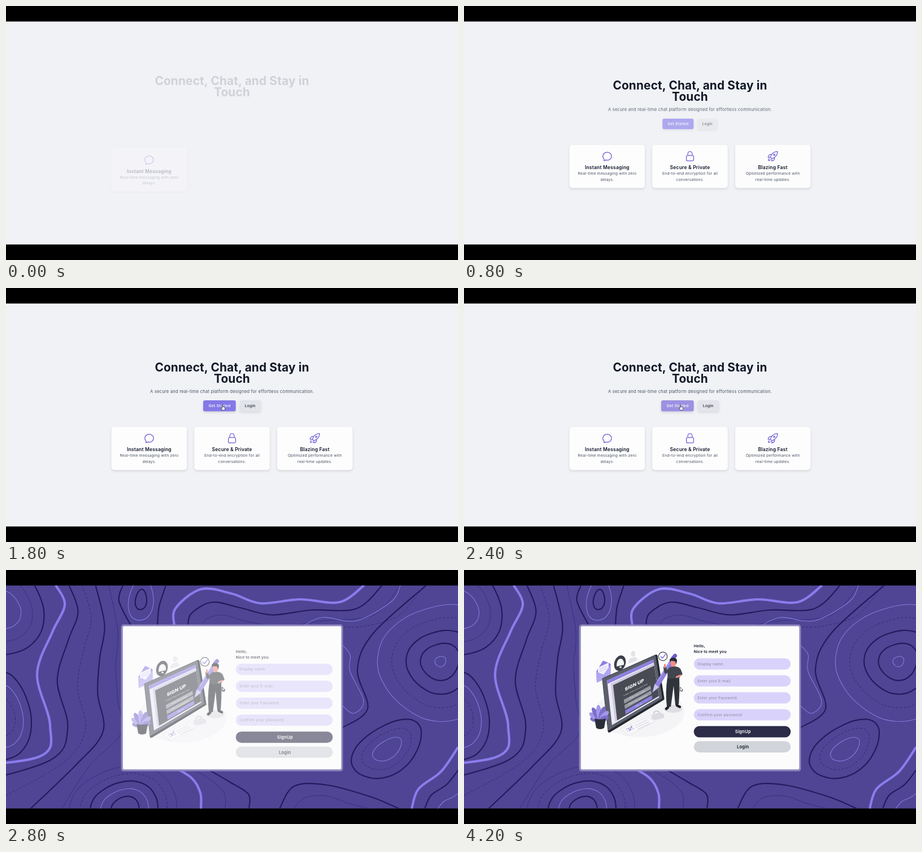
An HTML page for the animation above (4.4 s loop, 800 by 450 pixels).

```html
<!DOCTYPE html>
<html lang="en">
<head>
<meta charset="utf-8">
<title>Chat landing and sign-up</title>
<style>
  html, body { margin: 0; width: 100%; height: 100%; overflow: hidden; background: #000; }
  svg { display: block; width: 800px; height: 450px; }
  text { font-family: Inter, "Open Sans", sans-serif; letter-spacing: .022em; }
  .mid { text-anchor: middle; }
  .h1 { font-size: 20.8px; font-weight: 700; letter-spacing: .008em; fill: #111827; }
  .lead { font-size: 7.7px; fill: #4b5563; }
  .title { font-size: 8.53px; font-weight: 600; fill: #111827; }
  .desc { font-size: 6.83px; fill: #4b5563; }
  .btn { font-size: 6.83px; font-weight: 500; }
  .hello { font-size: 6.83px; font-weight: 600; fill: #111827; }
  .hint { font-size: 6.83px; fill: #8d89a2; }
  .cta { font-size: 7.68px; font-weight: 600; }
  .icon { fill: none; stroke: #6c5fd3; stroke-width: 1.5; stroke-linecap: round; stroke-linejoin: round; }
  .topo path { fill: none; }
  .topo .L { stroke: #8b7cec; stroke-width: 4.2; }
  .topo .D { stroke: #231a5e; stroke-width: 2.2; }
  .topo .l { stroke: #8579df; stroke-width: 1.1; }
  .topo .d { stroke: #392f80; stroke-width: 1; }
  .topo .s { stroke: #2f2673; stroke-width: .9; stroke-dasharray: 4 3; }
</style>
</head>
<body>
<svg viewBox="0 0 800 450" xmlns="http://www.w3.org/2000/svg">
  <defs>
    <clipPath id="view"><rect y="27.6" width="800" height="394.9"/></clipPath>
    <filter id="soft" x="-20%" y="-30%" width="140%" height="170%">
      <feDropShadow dx="0" dy="2" stdDeviation="2" flood-opacity=".13"/>
    </filter>
  </defs>
  <rect width="800" height="450"/>
  <g clip-path="url(#view)">
    <g id="home">
      <rect width="800" height="450" fill="#f1f2f6"/>
      <g id="head">
        <text class="h1 mid" x="400" y="147.6">Connect, Chat, and Stay in</text>
        <text class="h1 mid" x="400" y="167.8">Touch</text>
      </g>
      <g id="lead"><text class="lead mid" x="400" y="185.7">A secure and real-time chat platform designed for effortless communication.</text></g>
      <g id="buttons">
        <rect id="start" x="349" y="199" width="57.7" height="19.6" rx="3.4" filter="url(#soft)"/>
        <text class="btn mid" x="378" y="211.4" fill="#fff">Get Started</text>
        <rect x="413.5" y="199" width="37.5" height="19.6" rx="3.4" fill="#e3e4e9" filter="url(#soft)"/>
        <text class="btn mid" x="432.2" y="211.4" fill="#1f2937">Login</text>
      </g>
      <g id="cards"></g>
    </g>
    <g id="signup">
      <rect width="800" height="450" fill="#4f4594"/>
      <g id="topo" class="topo"></g>
      <rect x="203.6" y="96.6" width="392.8" height="260" rx="4.5" fill="#8d87bd"/>
      <rect x="206.8" y="99.6" width="386.6" height="253.6" rx="2.5" fill="#fcfcfd"/>
      <g id="content">
        <g id="art"></g>
        <g id="form"></g>
      </g>
    </g>
    <g id="cursor" stroke="#222" stroke-width=".7" stroke-linejoin="round" fill="#fff">
      <path id="arrow" d="M0 0V7.2L1.7 5.7 2.9 8.2 4.1 7.6 3 5.3 5.2 5.1Z"/>
      <path id="hand" d="M0 0H1.2V3Q5 3 5 5V7L4 9H.5L-2 5.4-1 4.9 0 5.7Z"/>
    </g>
  </g>
</svg>
<script>
const LOOP = 4400, STEP = 200, SIGNUP_AT = 2600;
const $ = id => document.getElementById(id);
const clamp = v => Math.max(0, Math.min(1, v));
const lerp = (a, b, k) => a + (b - a) * k;
const blend = (a, b, k) => a.map((v, i) => lerp(v, b[i], k));

// Smooth path through points
function curve(p, closed) {
  const n = p.length;
  const at = i => closed ? p[(i + n) % n] : p[Math.max(0, Math.min(n - 1, i))];
  let d = 'M' + p[0];
  for (let i = 0; i < n - !closed; i++) {
    const [a, b, c, e] = [at(i - 1), at(i), at(i + 1), at(i + 2)];
    const c1 = b.map((v, k) => v + (c[k] - a[k]) / 6);
    const c2 = c.map((v, k) => v - (e[k] - b[k]) / 6);
    d += `C${c1} ${c2} ${c}`;
  }
  return d + (closed ? 'Z' : '');
}

// Contour map; each letter of `kinds` is the line style of one contour
const contour = (kind, pts, closed) => `<path class="${kind}" d="${curve(pts, closed)}"/>`;

// Nested wobbly rings around a summit
function hill(cx, cy, tilt, kinds, rx, ry, growX, growY) {
  return [...kinds].map((kind, k) => contour(kind, Array.from({ length: 14 }, (_, i) => {
    const a = i / 14 * 2 * Math.PI, r = 1 + .05 * Math.sin(3 * a + cx);
    const x = r * (rx + k * growX) * Math.cos(a), y = r * (ry + k * growY) * Math.sin(a);
    const c = Math.cos(tilt), s = Math.sin(tilt);
    return [cx + x * c - y * s, cy + x * s + y * c];
  }), true)).join('');
}

// Lines spread evenly between two banks
function flow(kinds, from, to = from) {
  const points = s => s.split(' ').map(p => p.split(',').map(Number));
  const a = points(from), b = points(to);
  return [...kinds].map((kind, k) =>
    contour(kind, a.map((p, i) => blend(p, b[i], k / Math.max(1, kinds.length - 1))))).join('');
}

$('topo').innerHTML =
  hill(-6, 72, 0, 'ldD', 32, 34, 20, 24) +
  hill(-6, 262, 0, 'slD', 22, 34, 14, 22) +
  hill(239, 53, .1, 'Dl', 10, 18, 12, 20) +
  hill(212, 425, 0, 'DlDsd', 25, 24, 17.5, 13.5) +
  hill(769, 162, -.5, 'lDDsl', 10, 9, 25, 23) +
  hill(675, 318, -.6, 'lsD', 29, 16, 20, 13) +
  flow('LDsDd', '88,27 104,62 82,110 55,185 78,275 58,331 -110,350', '182,27 198,110 194,170 198,230 203,290 144,352 70,470') +
  flow('LDd', '298,100 300,68 345,34 400,42 450,59 520,52 590,57 634,27', '346,100 356,86 385,80 430,92 490,100 560,90 650,80 698,27') +
  flow('ls', '524,100 560,84 620,90 682,56 698,27', '570,100 630,100 690,84 720,55 740,27') +
  flow('DD', '207,27 200,55 222,100', '283,27 271,65 268,100') +
  flow('l', '594,132 609,150 609,180 633,232 615,254 594,239') +
  flow('D', '594,280 640,246 622,176 650,112 744,27') +
  flow('LdD', '345,423 344,395 328,368 290,345', '430,423 429,397 395,375 352,350') +
  flow('Dd', '484,423 510,383 568,381 646,402 696,423', '510,423 528,404 566,400 608,414 644,423') +
  flow('LDl', '718,423 730,388 770,357 800,314', '764,423 775,410 790,403 800,396');

const cards = [
  ['Instant Messaging', 'Real-time messaging with zero', 'delays.',
    'M5.3 17.5A9 8.25 0 1 1 9.4 19.9 6 6 0 0 1 5 20.9Q6.3 19 5.3 17.5Z'],
  ['Secure &amp; Private', 'End-to-end encryption for all', 'conversations.',
    'M16.5 10.5V6.75a4.5 4.5 0 1 0-9 0v3.75M6.75 10.5h10.5a2.25 2.25 0 0 1 2.25 2.25v6.75a2.25 2.25 0 0 1-2.25 2.25H6.75a2.25 2.25 0 0 1-2.25-2.25v-6.75a2.25 2.25 0 0 1 2.25-2.25Z'],
  ['Blazing Fast', 'Optimized performance with', 'real-time updates.',
    'M9.6 8.4A15 15 0 0 1 21.75 2.25 15 15 0 0 1 15.6 14.4 15 15 0 0 1 9.75 16.95L7.05 14.25A15 15 0 0 1 9.6 8.4a6 6 0 0 0-7.35 5.85h4.8M15.6 14.4a6 6 0 0 1-5.85 7.35v-4.8M4.5 16.6a4.5 4.5 0 0 0-1.75 4.3 4.5 4.5 0 0 0 4.3-1.75M16.5 9a1.5 1.5 0 1 1-3 0 1.5 1.5 0 0 1 3 0Z']
];
$('cards').innerHTML = cards.map(([title, a, b, icon], i) => {
  const x = 253.4 + 146.6 * i;
  return `<g><rect x="${x - 66.6}" y="246" width="133.2" height="76.2" rx="5" fill="#fdfdfe" filter="url(#soft)"/>
    <path class="icon" transform="translate(${x - 10.24} 255.9) scale(.853)" d="${icon}"/>
    <text class="title mid" x="${x}" y="289.4">${title}</text>
    <text class="desc mid" x="${x}" y="299.4">${a}</text>
    <text class="desc mid" x="${x}" y="309.6">${b}</text></g>`;
}).join('');

const pill = (y, fill) => `<rect x="406.7" y="${y}" width="171.6" height="20" rx="10" fill="${fill}"/>`;
$('form').innerHTML =
  '<text class="hello" x="406.8" y="137">Hello,</text><text class="hello" x="406.8" y="147.2">Nice to meet you</text>' +
  ['Display name.', 'Enter your E-mail.', 'Enter your Password.', 'Confirm your password'].map((s, i) =>
    pill(156.5 + 30 * i, '#d9d3fb') + `<text class="hint" x="413.3" y="${168.8 + 30 * i}">${s}</text>`).join('') +
  pill(276.6, '#2c2c48') + '<text class="cta mid" x="493.7" y="289.3" fill="#fff">SignUp</text>' +
  pill(303.3, '#d1d4d9') + '<text class="cta mid" x="493.7" y="316" fill="#111827">Login</text>';

// Illustration
const ink = '#3b3f48', lilac = '#8d7fe0', pale = '#c9c1f4', mist = '#e2e2e8', skin = '#ee8f88';
const shape = (d, fill) => `<path d="${d}" fill="${fill}"/>`;
const oval = (x, y, rx, ry, fill) => `<ellipse cx="${x}" cy="${y}" rx="${rx}" ry="${ry}" fill="${fill}"/>`;
const line = (d, color, w) => `<path d="${d}" fill="none" stroke="${color}" stroke-width="${w}" stroke-linecap="round" stroke-linejoin="round"/>`;

// Tablet plane: u runs along the top edge, v down the side
const plane = (u, v) => blend(blend([246, 193], [339, 152], u), blend([256, 285], [351, 228], u), v);
const panel = (u, v, u2, v2, fill, edge = 0) =>
  `<path d="M${plane(u, v)}L${plane(u2, v)} ${plane(u2, v2)} ${plane(u, v2)}Z" fill="${fill}" stroke="${fill}" stroke-width="${edge}" stroke-linejoin="round"/>`;
const label = (u, v, size, s, weight) =>
  `<text class="mid" transform="matrix(.94 -.46 .1 .92 ${plane(u, v).join(' ')})" font-size="${size}" font-weight="${weight}" fill="#fff">${s}</text>`;

const tablet =
  panel(.01, .01, 1.01, 1.01, '#24272e', 5) +
  panel(0, 0, .99, .98, '#5b5f6b', 2) +
  panel(.07, .06, .95, .93, '#eceaf8') +
  panel(.07, .06, .95, .13, lilac) +
  panel(.13, .15, .95, .9, '#cfcadf') +
  panel(.17, .2, .95, .9, '#484b54') +
  label(.55, .43, 8.6, 'SIGN UP', 800) +
  label(.56, .52, 3.1, 'Create a New Account is Free', 400) +
  ['Enter your e-mail', 'Enter your password', 'Sign up'].map((s, i) => {
    const v = .58 + .11 * i;
    return panel(.33, v, .83, v + .08, i < 2 ? '#989aa4' : lilac) + label(.58, v + .055, 3.4, s, 400);
  }).join('');

// Seven leaves fanned over the pot
const plant = Array.from({ length: 7 }, (_, i) => {
  const len = 17 + 10 * Math.sin(i / 6 * Math.PI);
  return `<ellipse cy="${-len / 2}" rx="4.6" ry="${len / 2}" transform="translate(240 266) rotate(${-80 + 25 * i})" fill="${i % 2 ? '#a297e8' : '#7b6fcb'}"/>`;
}).join('') + shape('M231 263Q241 266 251 263L248 280Q241 284 234 280Z', '#2c2e37');

const envelope =
  shape('M234 180 246 160.5 259.5 166V188L235 199.5Z', lilac) +
  shape('M237 173 256 164V184L237 192Z', '#f1effc') +
  line('M240 176 253 170M240 180 253 174', pale, 1) +
  shape('M234 180 247 185 259.5 168V188L235 199.5Z', '#b0a6f0');

const badges =
  `<g transform="rotate(18 276 165)">${oval(276, 165, 10, 14, ink)}</g>` +
  shape('M270 171Q270 158 277 157 284 158 283 168Z', '#f4f4f6') + oval(277, 172, 2, 1.6, '#f4f4f6') +
  oval(299.5, 148.5, 4, 5, mist) + shape('M291 166Q291 155 299 155 306 152 307 160Z', mist) +
  oval(352, 153, 8.3, 8.3, ink) + oval(352, 153, 7.1, 7.1, '#fff') +
  line('M348.5 153.5 351.3 156.3 356.5 149.5', lilac, 1.8);

const paper =
  line('M279 281 325 261 338 268 291 293Z', '#d6d6dc', 1) + shape('M279 281 325 261 338 268 291 293Z', '#f8f8fa') +
  line('M287 282 296 278 301 281 291 286Z', '#a5a6ae', .7) + line('M291 281 294 283.5 297 276', lilac, 1.3) +
  [0, 1, 2].map(i => line(`M${302 + 3 * i} ${276 + 3 * i}l22-10.500`, '#cdced6', 1)).join('') +
  line('M336 257V253Q339 248 345 251V256', '#d3d4db', 2) + shape('M332 257 347 252 354 256V262L338 266 332 263Z', '#dcdde2');

const pen =
  line('M342 203.5 370.5 158', lilac, 8.5) + line('M370 156 373.5 152', '#6b5cc5', 7) +
  line('M343 196.5 363 165', '#a89cf0', 2) + shape('M337.5 202 345.5 207.5 333.5 217Z', pale);

const man =
  shape('M360 190H381Q382 215 380 238L374 239.5 371 205 366 242.5 359 242Q356 216 360 190Z', '#2f343b') +
  line('M361 243.500 358 246M377 240 382 242.500', '#20222a', 4.500) +
  shape('M363 173Q372 168 381 173 385 180 381 192.5H360.5Q359 182 363 173Z', '#41454d') +
  line('M364 177 357 181 355.5 173', '#41454d', 5) + line('M355.5 172 355.5 168', skin, 3.5) +
  line('M381 176.5 384 184', '#41454d', 5) + line('M383 187 376.5 189.5', skin, 3.4) +
  oval(370.5, 165, 5, 6.5, skin) +
  shape('M365 163Q362 156 369 155.5 377 155 377 161L375.5 167 374 162 367 160.5Z', '#262831');

$('art').innerHTML = oval(311, 252, 79, 44, '#f4f4f6') + oval(370, 246, 16, 7, '#dedee3') +
  envelope + badges + tablet + paper + plant + pen + man;

// Motion
const ease = (t, start, dur) => 1 - Math.pow(1 - clamp((t - start) / dur), 1.5);
const show = (el, on) => el.setAttribute('display', on ? 'inline' : 'none');

function reveal(el, p, dy, scale = '') {
  el.setAttribute('opacity', p.toFixed(3));
  el.setAttribute('transform', `translate(0 ${(dy * (1 - p)).toFixed(2)})${scale}`);
}

function pointer(t) {
  const rest = blend([436, 36], [431, 70], clamp((t - 1000) / 200));
  return blend(rest, [382.5, 207.4], clamp((t - 1400) / 400));
}

function draw(t) {
  const second = t >= SIGNUP_AT, over = t >= 1800 && !second;
  show($('home'), !second);
  show($('signup'), second);

  reveal($('head'), ease(t, -72, 720), -8.6);
  reveal($('lead'), ease(t, 270, 720), 4.3);
  const b = ease(t, 550, 600), s = .9 + .1 * b;
  reveal($('buttons'), b, 0, ` translate(400 209) scale(${s.toFixed(4)}) translate(-400 -209)`);
  [...$('cards').children].forEach((el, i) => reveal(el, ease(t, 200 * i - 90, 500), 8.6));
  $('start').setAttribute('fill', `rgb(${blend([120, 110, 232], [156, 144, 225], clamp((t - 1700) / 300)).map(Math.round)})`);

  reveal($('content'), ease(t, SIGNUP_AT - 49, 600), 21.3);

  show($('cursor'), t >= 1000);
  show($('hand'), over);
  show($('arrow'), !over);
  $('cursor').setAttribute('transform', `translate(${pointer(t).join(' ')})`);
}

// The picture advances in steps of 200 ms
const t0 = performance.now() - 20;
function tick() {
  const t = (performance.now() - t0) % LOOP;
  draw(Math.floor(t / STEP) * STEP);
  requestAnimationFrame(tick);
}
tick();
</script>
</body>
</html>
```
